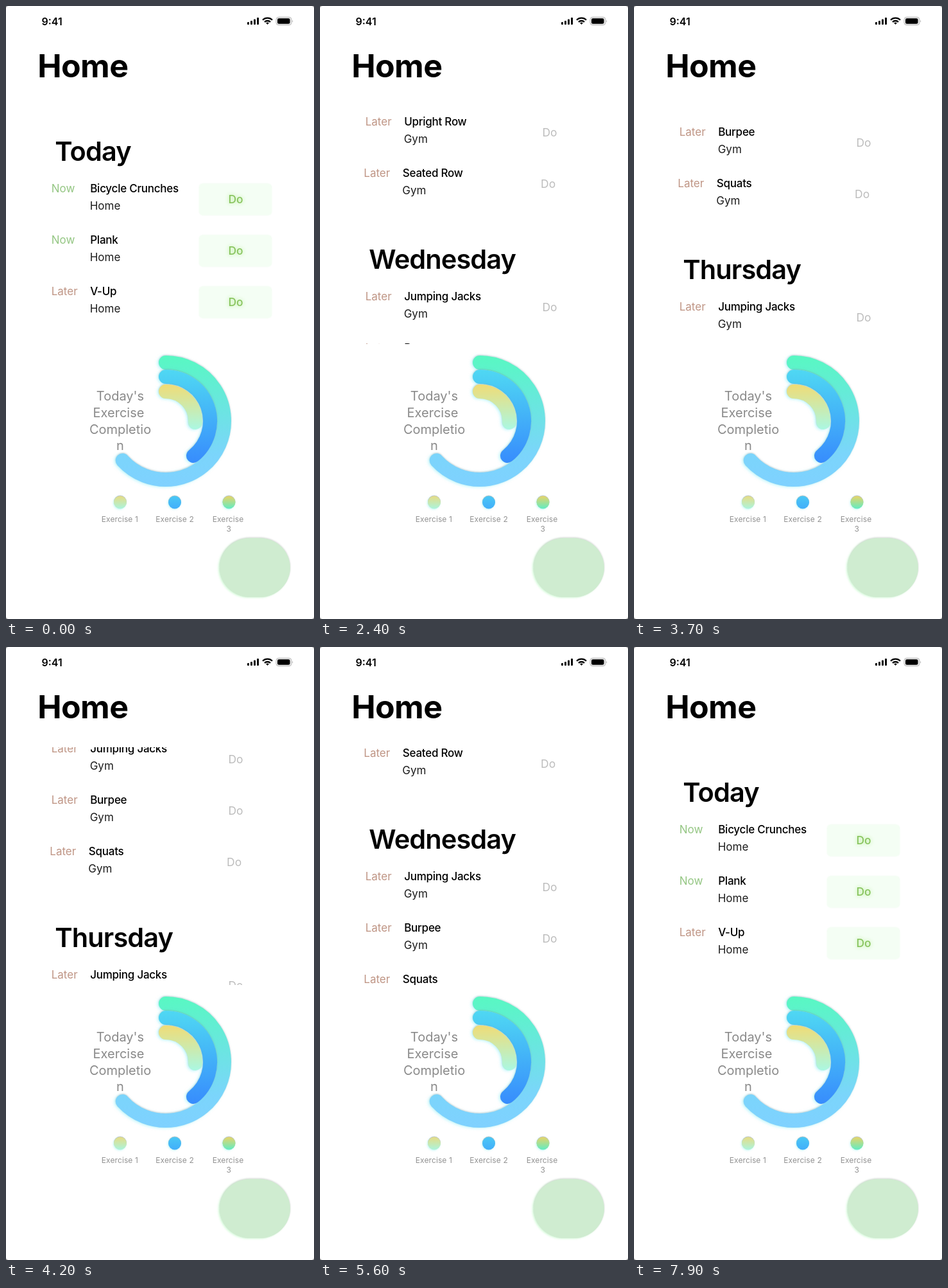
Recreate the animation shown at these times as an HTML page. Size 480 by 954 pixels, loop 8000 ms.

```html
<!DOCTYPE html>
<html lang="en">
<head>
<meta charset="utf-8">
<title>Home</title>
<style>
  html, body { margin: 0; width: 100%; height: 100%; overflow: hidden; background: #8a8a8a; }
  #stage { display: block; width: 100%; height: 100%; font-family: Inter, Roboto, sans-serif; }
  .heading { font-size: 50px; font-weight: 700; letter-spacing: -.6px; }
  .day { font-size: 41.5px; font-weight: 600; letter-spacing: -.9px; }
  .row { font-size: 17px; fill: #1c1c1c; }
  .name { font-weight: 500; fill: #000; letter-spacing: -.25px; }
  .now { fill: #94c683; }
  .later { fill: #bf9585; }
  .do { font-size: 17.4px; text-anchor: middle; fill: #bcbcbc; }
  .do.on { fill: #88c45e; font-weight: 500; filter: drop-shadow(0 0 3px #b4eb94); }
  .button { fill: #f4fef4; filter: drop-shadow(0 0 1px #effcef); }
  .clock { font-size: 16px; font-weight: 600; }
  .caption { font-size: 20px; fill: #8a8a8a; text-anchor: middle; }
  .legend { font-size: 12px; fill: #929292; text-anchor: middle; letter-spacing: .1px; }
  .rings path {
    fill: none; stroke-width: 22; stroke-linecap: round;
    filter: drop-shadow(.8px -.8px .8px rgba(110, 120, 130, .32)) drop-shadow(-1.5px 1.5px 2px rgba(130, 240, 250, .5));
  }
  .dots circle { filter: drop-shadow(.6px -.4px .5px rgba(110, 120, 130, .4)) drop-shadow(-1px 1px 1.5px rgba(140, 240, 235, .5)); }
  .blob { fill: #cfecd0; filter: drop-shadow(.8px -.8px .8px rgba(150, 140, 150, .35)) drop-shadow(-1.5px 1.5px 1.5px rgba(205, 250, 210, .8)); }
</style>
</head>
<body>
<svg id="stage" viewBox="0 0 480 954" preserveAspectRatio="none">
  <defs>
    <linearGradient id="mint" gradientUnits="userSpaceOnUse" x1="0" y1="544" x2="0" y2="748">
      <stop offset="0" stop-color="#58f8c2"/><stop offset=".75" stop-color="#7bd5fb"/><stop offset="1" stop-color="#7fd1ff"/>
    </linearGradient>
    <linearGradient id="blue" gradientUnits="userSpaceOnUse" x1="0" y1="566" x2="0" y2="711">
      <stop offset="0" stop-color="#4fd8f3"/><stop offset="1" stop-color="#378cfd"/>
    </linearGradient>
    <linearGradient id="sun" gradientUnits="userSpaceOnUse" x1="0" y1="589" x2="0" y2="660">
      <stop offset="0" stop-color="#f0dc76"/><stop offset="1" stop-color="#a9f8e4"/>
    </linearGradient>
    <linearGradient id="dotA" x2="0" y2="1"><stop stop-color="#e6dc84"/><stop offset="1" stop-color="#abf4dd"/></linearGradient>
    <linearGradient id="dotB" x2="0" y2="1"><stop stop-color="#4ac8f5"/><stop offset="1" stop-color="#42aefa"/></linearGradient>
    <linearGradient id="dotC" x2="0" y2="1"><stop stop-color="#e8d468"/><stop offset="1" stop-color="#60ecc4"/></linearGradient>
  </defs>

  <rect width="480" height="954" rx="4" fill="#fff"/>

  <text class="clock" x="55.5" y="30.2">9:41</text>
  <g id="signal">
    <rect x="376" y="25" width="3" height="4" rx="1"/>
    <rect x="381" y="23" width="3" height="6" rx="1"/>
    <rect x="386" y="20.5" width="3" height="8.5" rx="1"/>
    <rect x="391" y="18" width="3" height="11" rx="1"/>
  </g>
  <g fill="none" stroke="#000" stroke-width="2.3">
    <path d="M400 21.8a10.6 10.6 0 0 1 15 0"/>
    <path d="M403 24.9a6.3 6.3 0 0 1 9 0"/>
    <path d="M407.5 28.6l-2-2a3 3 0 0 1 4 0z" fill="#000" stroke-width=".6"/>
  </g>
  <rect x="421" y="17.2" width="24" height="12.6" rx="4" fill="#e6e6e6" stroke="#bdbdbd"/>
  <rect x="423" y="19.2" width="19.5" height="8.6" rx="2.4"/>
  <path d="M446.3 21.5q1.6 2 0 4z" fill="#aaa"/>

  <text class="heading" x="49.3" y="111.3">Home</text>

  <svg x="0" y="156" width="480" height="370" viewBox="0 156 480 370">
    <g id="list"></g>
  </svg>

  <g class="rings">
    <path d="M249 555A91 91 0 1 1 181.7 707.3" stroke="url(#mint)"/>
    <path d="M249 577A69 69 0 0 1 292 700" stroke="url(#blue)"/>
    <path d="M249 600A46 46 0 0 1 295 648" stroke="url(#sun)"/>
  </g>
  <g class="caption">
    <text x="178" y="614.3">Today's</text>
    <text x="175.5" y="640">Exercise</text>
    <text x="178" y="665.5">Completio</text>
    <text x="178" y="691">n</text>
  </g>
  <g class="dots">
    <circle cx="178" cy="772.5" r="10" fill="url(#dotA)"/>
    <circle cx="263" cy="772.5" r="10" fill="url(#dotB)"/>
    <circle cx="347.5" cy="772.5" r="10" fill="url(#dotC)"/>
  </g>
  <g class="legend">
    <text x="177.3" y="803">Exercise 1</text>
    <text x="263" y="803">Exercise 2</text>
    <text x="346" y="803">Exercise</text>
    <text x="347.3" y="817.5">3</text>
  </g>
  <rect class="blob" x="333" y="828" width="110" height="92" rx="47" ry="46"/>
</svg>

<script>
  const LOOP = 8000, TICK = 100, PAGE = 352, ROW = 80;
  const days = [
    ["Today", "Home", ["Bicycle Crunches", "Plank", "V-Up"]],
    ["Tomorrow", "Gym", ["Bench Press", "Upright Row", "Seated Row"]],
    ["Wednesday", "Gym", ["Jumping Jacks", "Burpee", "Squats"]],
    ["Thursday", "Gym", ["Jumping Jacks"]]
  ];

  const text = (cls, x, y, str) => `<text class="${cls}" x="${x}" y="${y}">${str}</text>`;

  function row(name, place, day, i) {
    const today = day === 0;
    const now = today && i < 2;
    const x = !today && i === 2 ? -2.4 : 0;
    const y = day * PAGE + i * ROW;
    return `<g class="row" transform="translate(${x} ${y})">` +
      (today ? '<rect class="button" x="301" y="276.5" width="113" height="49" rx="6"/>' : "") +
      text(now ? "now" : "later", 70.7, 290.3, now ? "Now" : "Later") +
      text("name", 131.2, 290.3, name) +
      text("", 130.7, 317, place) +
      text(today ? "do on" : "do", 358, 307.3, "Do") + "</g>";
  }

  const list = document.getElementById("list");
  list.innerHTML = days.map(([title, place, names], day) =>
    text("day", 76.3, 241.3 + day * PAGE, title) +
    names.map((name, i) => row(name, place, day, i)).join("")
  ).join("");

  const ease = {
    in: u => u * u,
    out: u => u * (2 - u),
    both: u => (1 - Math.cos(Math.PI * u)) / 2
  };
  // time, scroll offset, easing on the way there
  const keys = [
    [0, 0, "both"], [700, 0, "both"],
    [1100, 180, "in"], [1500, 352, "out"], [2000, 352, "both"],
    [2400, 536.5, "in"], [2800, 704, "out"], [3100, 704, "both"],
    [3600, 872, "both"], [4000, 872, "both"],
    [4600, 704, "both"], [5300, 704, "both"],
    [6300, 352, "both"], [6500, 352, "both"], [6600, 350.5, "in"],
    [7600, 0, "both"], [LOOP, 0, "both"]
  ];

  function scrollAt(t) {
    const k = keys.findIndex(key => key[0] > t);
    const [t0, y0] = keys[k - 1], [t1, y1, kind] = keys[k];
    return y0 + (y1 - y0) * ease[kind]((t - t0) / (t1 - t0));
  }

  function draw() {
    const t = Math.floor(performance.now() % LOOP / TICK) * TICK;
    list.setAttribute("transform", `translate(0 ${-scrollAt(t)})`);
    requestAnimationFrame(draw);
  }
  draw();
</script>
</body>
</html>
```
